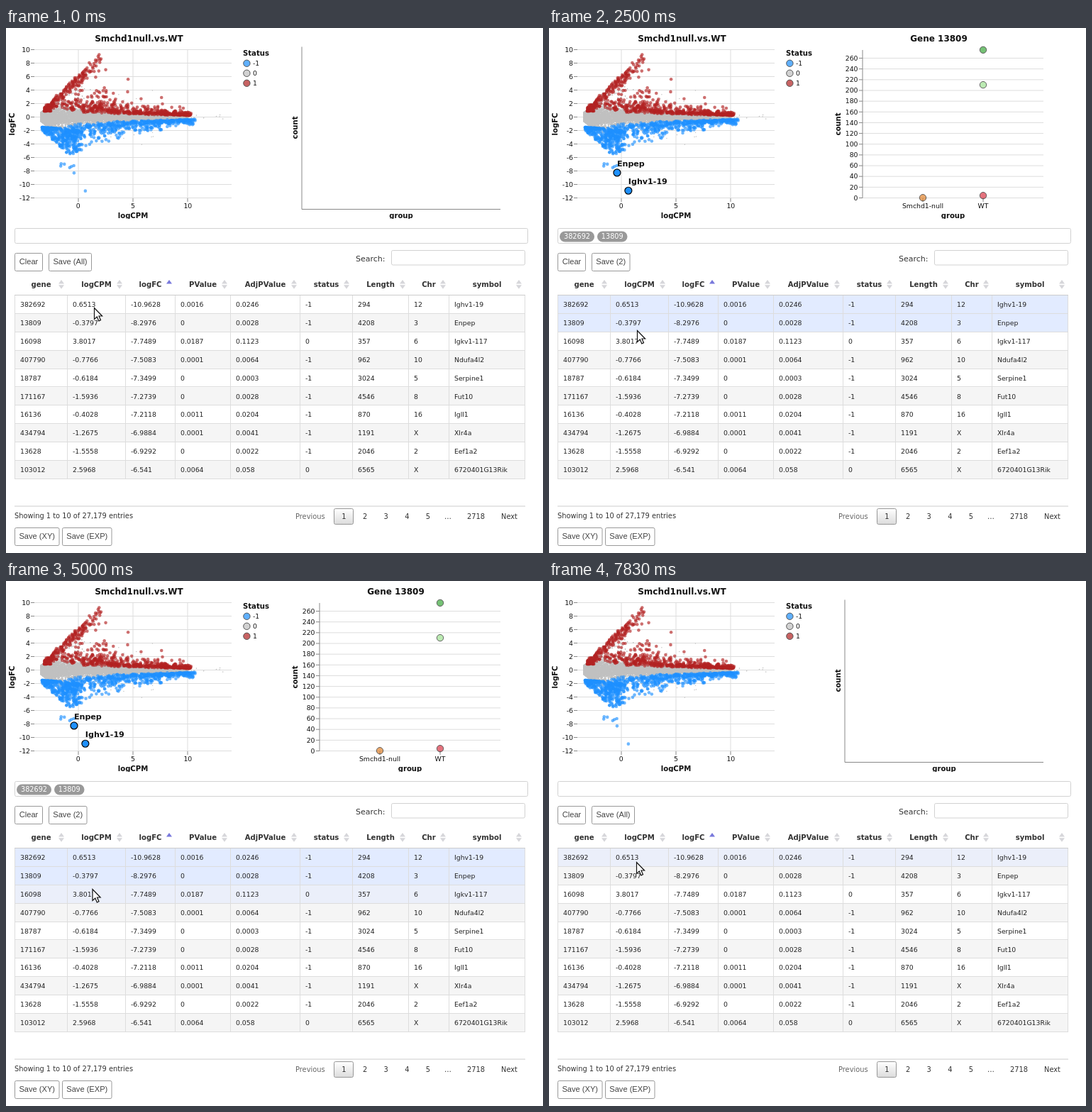
Recreate the animation shown at these times as an HTML page with a canvas. Size 757 px wide and 740 px high, loop 8330 ms.

```html
<!DOCTYPE html>
<html lang="en">
<head>
<meta charset="utf-8">
<title>Expression explorer</title>
<style>
  html, body { margin: 0; width: 100%; height: 100%; overflow: hidden; background: #fff; }
  canvas, svg { position: absolute; left: 0; top: 0; width: 757px; height: 740px; }
  text { font-family: "DejaVu Sans", sans-serif; white-space: pre; }
  .button { font-family: "Liberation Sans", Arial, sans-serif; }
</style>
</head>
<body>
<canvas id="plot" width="757" height="740"></canvas>
<svg id="view" viewBox="0 0 757 740">
  <defs>
    <linearGradient id="page" x2="0" y2="1"><stop stop-color="#fff"/><stop offset="1" stop-color="#dcdcdc"/></linearGradient>
  </defs>
  <g id="rows"></g><g id="fixed"></g><g id="live"></g>
</svg>
<script>
const LOOP = 8330, STEP = 166.6;
const $ = id => document.getElementById(id);

const table = `382692 0.6513 -10.9628 0.0016 0.0246 -1 294 12 Ighv1-19
13809 -0.3797 -8.2976 0 0.0028 -1 4208 3 Enpep
16098 3.8017 -7.7489 0.0187 0.1123 0 357 6 Igkv1-117
407790 -0.7766 -7.5083 0.0001 0.0064 -1 962 10 Ndufa4l2
18787 -0.6184 -7.3499 0 0.0003 -1 3024 5 Serpine1
171167 -1.5936 -7.2739 0 0.0028 -1 4546 8 Fut10
16136 -0.4028 -7.2118 0.0011 0.0204 -1 870 16 Igll1
434794 -1.2675 -6.9884 0.0001 0.0041 -1 1191 X Xlr4a
13628 -1.5558 -6.9292 0 0.0022 -1 2046 2 Eef1a2
103012 2.5968 -6.541 0.0064 0.058 0 6565 X 6720401G13Rik`.split('\n').map(r => r.split(' '));
const heads = 'gene logCPM logFC PValue AdjPValue status Length Chr symbol'.split(' ');
const cols = [12, 86, 168, 238, 316, 414, 488, 567, 624, 731];
const TOP = 377, ROW = 25.88;

const X = v => 101.8 + v * 15.45, Y = v => 125.5 - v * 9.5;
const DARK = '#333', AXIS = '#888', GRID = '#ddd';
const BLUE = '#1e90ff', SILVER = '#c0c0c0', BRICK = '#b22222';

// SVG helpers
const text = (s, x, y, size, o = {}) =>
  `<text x="${x}" y="${y}" font-size="${size}" fill="${o.fill || '#111'}" text-anchor="${o.at || 'start'}"` +
  `${o.bold ? ' font-weight="700"' : ''}${o.cls ? ` class="${o.cls}"` : ''}` +
  `${o.up ? ` transform="rotate(-90 ${x} ${y})"` : ''}>${s}</text>`;
const mid = { at: 'middle' }, bold = { bold: 1 }, boldMid = { bold: 1, at: 'middle' };
const rect = (x, y, w, h, fill, stroke = 'none', r = 0) =>
  `<rect x="${x}" y="${y}" width="${w}" height="${h}" rx="${r}" fill="${fill}" stroke="${stroke}"/>`;
const path = (d, stroke, fill = 'none', w = 1) =>
  `<path d="${d}" stroke="${stroke}" fill="${fill}" stroke-width="${w}"/>`;
const dot = (x, y, fill, alpha = 1, r = 4.7, w = .95) =>
  `<circle cx="${x}" cy="${y}" r="${r}" fill="${fill}" opacity="${alpha}" stroke="#000" stroke-width="${w}"/>`;
const button = (s, x, y, w) => rect(x + .5, y + .5, w, 25, '#fff', '#999', 2) +
  text(s, x + .5 + w / 2, y + 16.4, 11.1, { fill: '#444', at: 'middle', cls: 'button' });

// Scatter cloud
function drawCloud() {
  const ctx = $('plot').getContext('2d');
  let seed = 7;
  const rnd = () => {
    seed = seed + 0x6D2B79F5 | 0;
    let t = Math.imul(seed ^ seed >>> 15, 1 | seed);
    t = t + Math.imul(t ^ t >>> 7, 61 | t) ^ t;
    return ((t ^ t >>> 14) >>> 0) / 4294967296;
  };
  const norm = () => Math.sqrt(-2 * Math.log(1 - rnd())) * Math.cos(6.2832 * rnd());
  const tail = () => -Math.log(1 - rnd());
  const line = (x, y, w, h, c) => { ctx.fillStyle = c; ctx.fillRect(x, y, w, h); };
  const put = (x, y, r = 2.3) => { ctx.beginPath(); ctx.arc(X(x), Y(y), r, 0, 7); ctx.fill(); };
  const many = (n, make, r) => { while (n--) put(...make(), r); };

  for (let v = -12; v <= 10; v += 2) { line(40, Y(v) - .5, 278, 1, GRID); line(35, Y(v) - .5, 5, 1, AXIS); }
  for (const v of [0, 5, 10]) { line(Math.round(X(v)) - .5, 30, 1, 209, GRID); line(Math.round(X(v)) - .5, 240, 1, 5, AXIS); }

  // Limits of the cloud above and below the zero line
  const above = x => 1.5 + (x + 3) * 1.55;
  const below = x => x < -.8 ? 2 + (x + 3.3) * 1.5 : 5.8 * Math.exp(-.13 * (x + .8));
  const inside = (y, limit) => y < limit ? y : limit * (.35 + .6 * rnd());

  ctx.fillStyle = SILVER;
  many(6500, () => {
    const x = -3.4 + rnd() ** 1.5 * 13.4, s = .85 * Math.exp(-.16 * (x + 3)) + .06;
    const y = norm() * s, tip = .7 + (x + 3.4) * 1.3;
    return [x, Math.sign(y) * inside(Math.abs(y), tip)];
  }, 1);
  many(450, () => {
    const x = -3 + rnd() * 5 * rnd();
    return [x, rnd() < .6 ? above(x) * rnd() : -.6 * below(x) * rnd()];
  }, .9);
  many(90, () => [1 + rnd() * 6, norm() * 1.8], .7);
  many(24, () => [9 + rnd() * rnd() * 5, norm() * .2], .8);

  ctx.globalAlpha = .65;
  ctx.fillStyle = BLUE;
  many(300, () => {
    const x = -3.3 + rnd() * 3.6, hi = 1.5 + (x + 3.3) * .12;
    return [x, -hi - (below(x) - hi) * rnd() ** 1.5];
  });
  many(520, () => {
    const x = -1.5 + rnd() * 12.2, floor = 1.3 * Math.exp(-.12 * x) * (.75 + .4 * rnd());
    return [x, -inside(floor + tail() * (1.15 * Math.exp(-.16 * x) + .05), below(x))];
  });
  table.forEach(r => r[5] < 0 && put(+r[1], +r[2]));

  ctx.fillStyle = BRICK;
  many(200, () => {
    const x = -3.1 + rnd() ** 1.5 * 5.2;
    return [x, Math.max(.9, above(x) - Math.abs(norm()) * .8 + norm() * .15)];
  });
  many(470, () => {
    const x = -2 + rnd() ** .8 * 12.3, floor = .95 * Math.exp(-.13 * x) * (.75 + .5 * rnd());
    return [x, inside(floor + tail() * (.9 * Math.exp(-.24 * x) + .12), above(x))];
  });
  many(35, () => { const x = -.5 + rnd() * 3.2; return [x, 1.5 + rnd() * 6 * rnd()]; });
  put(4.55, 5.6);
  put(7.6, 2.9);
}

function fixedParts() {
  let s = text('Smchd1null.vs.WT', 187.5, 19, 12, boldMid) +
    text('logCPM', 179, 268, 10.1, boldMid) +
    text('logFC', 12, 135.5, 10.1, { ...boldMid, up: 1 }) +
    text('Status', 334, 39, 10.1, bold);
  for (let v = -12; v <= 10; v += 2) s += text(v, 34, Y(v) + 3.2, 9.3, { at: 'end' });
  for (const v of [0, 5, 10]) s += text(v, X(v), 254, 9.3, mid);
  [BLUE, SILVER, BRICK].forEach((c, i) =>
    s += dot(339.4, 49.8 + i * 14, c, .7) + text(i - 1, 348, 53.2 + i * 14, 9.3));

  s += rect(12.5, 282.5, 723, 21, '#fff', '#d2d2d2', 2) + rect(543.5, 313.5, 188, 20.5, '#fff', '#d2d2d2', 2) +
    text('Search:', 493, 329, 11, { fill: DARK }) + button('Clear', 12, 317, 39);

  heads.forEach((h, i) => {
    const x = cols[i + 1] - 8, sorted = h === 'logFC';
    s += text(h, (cols[i] + cols[i + 1] + 1) / 2, 365, 10.1, { ...boldMid, fill: DARK });
    s += path(`M${x - 4} 360.5h8l-4-5.5z`, 'none', sorted ? '#7878dc' : '#d6d6da');
    if (!sorted) s += path(`M${x - 4} 362.3h8l-4 5.5z`, 'none', '#d6d6da');
  });
  for (let i = 0; i <= 10; i++) s += path(`M12 ${Math.round(TOP + i * ROW) - .5}H732`, i ? GRID : '#ccc');
  for (const x of cols) s += path(`M${x + .5} 377V636`, GRID);
  table.forEach((r, i) => r.forEach((v, j) =>
    s += text(v, cols[j] + 8, TOP + i * ROW + 16.1, 9.3, { fill: '#222' })));

  const foot = (v, x, o) => s += text(v, x, 692, 9.85, { fill: DARK, ...o });
  s += path('M12 674H732', '#ccc') + rect(462.5, 677.5, 27, 22, 'url(#page)', '#979797', 2);
  s += text('Showing 1 to 10 of 27,179 entries', 12, 691, 9.83, { fill: DARK });
  foot('Previous', 408, { fill: '#666' });
  for (let i = 0; i < 5; i++) foot(i + 1, 476.5 + i * 29.6, mid);
  foot('…', 623, mid);
  foot('2718', 662.5, mid);
  foot('Next', 709.5, mid);
  return s + button('Save (XY)', 12, 704, 62.5) + button('Save (EXP)', 79, 704, 69.5);
}

// Count charts: axis start, tick step, last tick, pixels per tick, points [group, count, colour]
const GREEN = '#2ca02c', LIME = '#98df8a', ORANGE = '#e07b1e', BROWN = '#b8651b', PEACH = '#ffbb78', RED = '#d62738';
const charts = [
  { left: 450, tick: 200, max: 2200, px: 17.95,
    points: [[0, 0, ORANGE], [1, 2240, GREEN], [1, 2320, LIME], [1, 3, RED]] },
  { left: 442, tick: 20, max: 260, px: 15.15,
    points: [[0, 0, ORANGE], [1, 275, GREEN], [1, 210, LIME], [1, 4, RED]] },
  { left: 450, tick: 500, max: 6500, px: 14.95,
    points: [[0, 6970, PEACH], [0, 0, BROWN], [1, 6570, GREEN], [1, 5540, LIME], [1, 50, RED]] }
];

function countChart(n) {
  const label = y => text('count', 411, y, 10.1, { ...boldMid, up: 1 });
  if (!n) return path('M417 26.5V255.5H697', AXIS) + label(140.5) + text('group', 557, 268, 10.1, boldMid);
  const c = charts[n - 1], l = c.left;
  const y = v => 239.5 - v / c.tick * c.px;
  const groupX = g => l + (697 - l) * (1 + g) / 3;
  let s = text('Gene ' + table[n - 1][0], 549.5, 19, 12, boldMid) + label(135.5) +
    text('group', (l + 697) / 2, 268, 10.1, boldMid);
  for (let v = 0; v <= c.max; v += c.tick) {
    s += path(`M${l} ${y(v)}H697`, GRID) + path(`M${l - 5} ${y(v)}h5`, AXIS) +
      text(v.toLocaleString('en-US'), l - 6.5, y(v) + 3.2, 9.3, { at: 'end' });
  }
  s += path(`M${l} 31V239.5`, AXIS);
  ['Smchd1-null', 'WT'].forEach((g, i) => s += path(`M${groupX(i)} 240v5`, AXIS) + text(g, groupX(i), 254, 9.3, mid));
  for (const [g, v, fill] of c.points) s += dot(groupX(g), y(v) - .3, fill, .65);
  return s;
}

// Pointer keys: step, x, y
const keys = [[0, 124, 394], [7, 126, 401], [11, 131, 410], [14, 127, 416], [15, 124, 426], [18, 121, 446],
  [28, 121, 446], [32, 122, 422], [36, 122, 422], [39, 123, 396], [50, 123, 396]];
const selectAt = [4, 13, 19], clearAt = [28, 34, 44];

function pointer(k) {
  const i = keys.findIndex(p => p[0] > k), [a, ax, ay] = keys[i - 1], [b, bx, by] = keys[i];
  const f = (k - a) / (b - a);
  return [ax + (bx - ax) * f, ay + (by - ay) * f];
}

function render(k) {
  const passed = steps => steps.filter(at => k >= at).length;
  const n = passed(selectAt) - passed(clearAt);
  const [px, py] = pointer(k);
  const hover = k ? Math.floor((py - TOP) / ROW) : -1;

  $('rows').innerHTML = table.map((_, i) => rect(12, TOP + i * ROW, 720, ROW,
    i < n ? '#e2ebff' : i === hover ? '#ebeffa' : i % 2 ? '#f5f5f5' : '#fff')).join('');

  let s = countChart(n), chipX = 15;
  table.slice(0, n).forEach(r => {
    const x = X(+r[1]), y = Y(+r[2]) - .4, w = r[0].length * 6.5 + 10;
    s += dot(x, y, r[5] === '0' ? SILVER : BLUE, 1, 5, 1.2) + text(r[8], x, y - 9.2, 11.1, bold);
    s += rect(chipX, 286.5, w, 15, '#999', 'none', 7.5) + text(r[0], chipX + w / 2, 297.4, 9.7, { ...mid, fill: '#fff' });
    chipX += w + 4;
  });
  s += rect(0, 269, 757, 12, '#fff') + button(`Save (${n || 'All'})`, 60, 317, n ? 53.5 : 60);
  s += `<g transform="translate(${px} ${py})">` +
    path('M.5 .6V16.4L4.3 13L6.8 18.9L9.5 17.8L7 12H11.6Z', '#111', '#fff', 1.2) + '</g>';
  $('live').innerHTML = s;
}

drawCloud();
$('fixed').innerHTML = fixedParts();
let shown = -1;
function frame() {
  const k = Math.min(49, Math.floor((performance.now() % LOOP + 7) / STEP));
  if (k !== shown) render(shown = k);
  requestAnimationFrame(frame);
}
frame();
</script>
</body>
</html>
```
